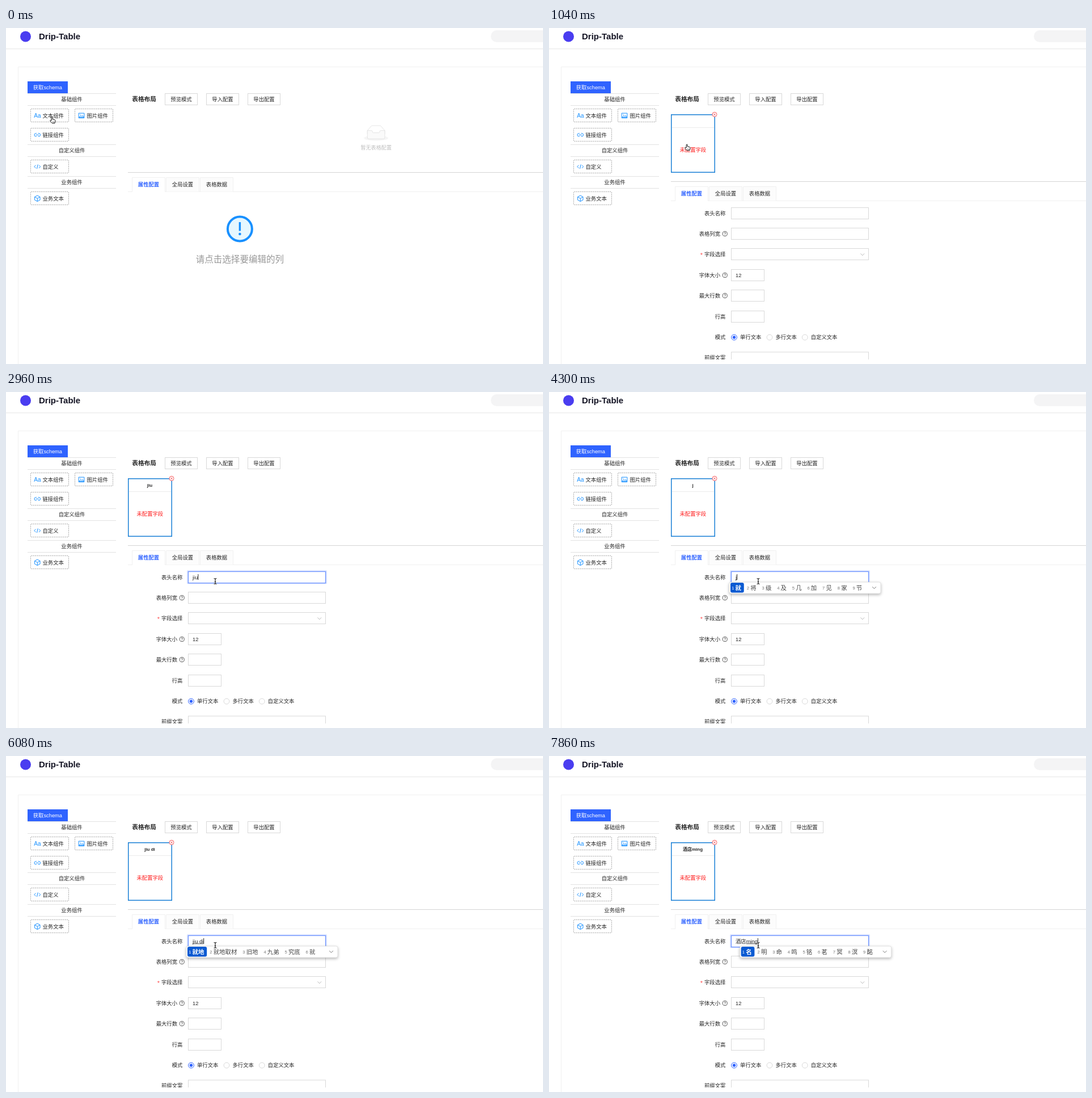
An HTML page that plays this animation: 947 px wide and 592 px high, repeating every 8000 ms.

```html
<!DOCTYPE html>
<html lang="zh-CN">
<head>
<meta charset="utf-8">
<title>Drip-Table</title>
<style>
  html, body { margin: 0; width: 100%; height: 100%; overflow: hidden; background: #fff; }
  svg { display: block; width: 947px; height: 592px; }
  text { font-family: "Liberation Sans", "Noto Sans CJK SC", "Noto Sans CJK", sans-serif; white-space: pre; }
</style>
</head>
<body>
<svg id="stage" viewBox="0 0 947 592" fill="none"></svg>
<script>
const LOOP = 8000;
const BLUE = '#2f63ff', SKY = '#1890ff', INK = '#262626', EDGE = '#d9d9d9', FAINT = '#f0f0f0';

const label = (x, cy, s, { size = 9.33, fill = INK, anchor = 'start', weight = 400, id = '' } = {}) =>
  `<text id="${id}" x="${x}" y="${cy + size * .36}" font-size="${size}" fill="${fill}" text-anchor="${anchor}" font-weight="${weight}">${s}</text>`;
const box = (x, y, w, h, extra = '') =>
  `<rect x="${x + .5}" y="${y + .5}" width="${w - 1}" height="${h - 1}" stroke="${EDGE}" ${extra}/>`;
const path = (d, extra = '') => `<path d="${d}" ${extra}/>`;
const hline = (x1, x2, y, color = EDGE) => path(`M${x1} ${y}H${x2}`, `stroke="${color}"`);
const group = (id, body, extra = '') => `<g id="${id}" ${extra}>${body}</g>`;

const icons = {
  text: label(0, 6.2, 'Aa', { size: 10, fill: SKY }),
  image: path('M.8 1.8H10.6V10.2H.8ZM1.8 9L4.5 5.8 6.3 7.6 8 6 9.8 9ZM3 4h1.2') ,
  link: path('M4.8 3.4H3.3a2.6 2.6 0 0 0 0 5.2H4.8M7.2 3.4H8.7a2.6 2.6 0 0 1 0 5.2H7.2M3.6 6H8.4'),
  code: path('M3.2 3.3L.6 6 3.2 8.7M8.8 3.3L11.4 6 8.8 8.7M6.8 2.2L5.2 9.8'),
  cube: path('M6 .8L10.7 3.3V8.7L6 11.2 1.3 8.7V3.3ZM1.3 3.3L6 6 10.7 3.3M6 6V11.2')
};
const block = (x, y, icon, name) =>
  box(x, y, 68, 24, 'fill="#fff" style="stroke:#a6a6a6" rx="1" stroke-dasharray="2 1.3"') +
  `<g transform="translate(${x + 6.3} ${y + 6.3})" stroke="${icon === 'text' ? 'none' : SKY}">${icons[icon]}</g>` +
  label(x + 21.5, y + 12.7, name);

const section = (y, name) =>
  hline(38, 194, y + .5, '#e2e2e2') + hline(38, 194, y + 21.5, '#e2e2e2') +
  label(116, y + 11, name, { anchor: 'middle' });

const header = `
  <circle cx="34.5" cy="15" r="9.5" fill="#4a3df0"/>
  ${label(58, 15, 'Drip-Table', { size: 15, fill: '#141424', weight: 700 })}
  <rect x="855" y="4" width="110" height="21" rx="10.5" fill="#f4f4f5"/>
  ${hline(0, 947, 36.5, '#ececec')}${hline(0, 947, 37.5, '#f8f8f8')}
  ${path('M21.5 592V68.5H947', `stroke="${FAINT}"`)}`;

const sidebar = `
  <rect x="38" y="94" width="71" height="21" fill="${BLUE}"/>
  ${label(73.4, 104.7, '获取schema', { fill: '#fff', anchor: 'middle' })}
  ${section(115, '基础组件')}${section(205, '自定义组件')}${section(261, '业务组件')}
  ${block(43, 142, 'text', '文本组件')}${block(121, 142, 'image', '图片组件')}
  ${block(43, 176, 'link', '链接组件')}${block(43, 232, 'code', '自定义')}
  ${block(43, 288, 'cube', '业务文本')}`;

const toolbar = label(222.3, 125.5, '表格布局', { size: 10.67, weight: 700 }) +
  ['预览模式', '导入配置', '导出配置'].map((name, i) =>
    box(280 + i * 73, 115, 58, 21) + label(309 + i * 73, 125.7, name, { anchor: 'middle' })).join('');

const emptyTable = `
  <g transform="translate(631.3 172) scale(.667)" stroke="${EDGE}">
    <ellipse cx="32" cy="33" rx="32" ry="7" fill="#f5f5f5" stroke="none"/>
    <path d="M9 13L19.2 1.3Q20 0 21.1 0H42.9Q44 0 44.8 1.3L55 13V22H9Z" fill="#fff"/>
    <path d="M9 13H20.2Q22.4 13.2 22.4 16T24.6 18.9H39.4Q41.6 18.7 41.6 16T43.8 13H55V31Q55 35 52 35H12Q9 35 9 31Z" fill="#fafafa"/>
  </g>
  ${label(652.7, 210.7, '暂无表格配置', { size: 9.1, fill: '#bfbfbf', anchor: 'middle' })}`;

const tabs = hline(215, 947, 254.5, '#d4d4d4') + hline(215, 947, 288.5, FAINT) +
  ['属性配置', '全局设置', '表格数据'].map((name, i) => {
    const x = 222 + i * 60;
    return `<path d="M${x + .5} 288.5V263.5H${x + 58.5}V288.5" stroke="${FAINT}" fill="${i ? '#fcfcfc' : '#fff'}"/>` +
      (i ? '' : hline(x + 1, x + 58, 288.5, '#fff')) +
      label(x + 29.5, 276, name, { anchor: 'middle', fill: i ? INK : BLUE, weight: i ? 400 : 700 });
  }).join('');

const prompt = `
  <circle cx="412.4" cy="354" r="21.5" fill="#e6f7ff" stroke="${SKY}" stroke-width="4"/>
  <rect x="410.7" y="342" width="3.4" height="15.5" rx=".6" fill="${SKY}"/>
  <circle cx="412.4" cy="363" r="2.3" fill="${SKY}"/>
  ${label(412.4, 407, '请点击选择要编辑的列', { size: 15.55, fill: '#999', anchor: 'middle' })}`;

const card = `
  <rect x="215.75" y="152.75" width="76.5" height="101.5" fill="#fff" stroke="#1a80d6" stroke-width="1.5"/>
  ${hline(217, 291, 175.5, '#ebebeb')}
  ${label(253.5, 163.8, '', { size: 8, weight: 700, anchor: 'middle', id: 'title' })}
  ${label(253.8, 214.8, '未配置字段', { fill: '#ff1a1a', anchor: 'middle' })}
  <circle cx="292" cy="152.3" r="4" fill="#fff" stroke="#f5484b" stroke-width=".9"/>
  ${path('M290.4 150.7l3.2 3.2m0-3.2l-3.2 3.2', 'stroke="#f5484b" stroke-width=".9"')}`;

const help = cy => `<circle cx="310.2" cy="${cy}" r="4.1" stroke="#444" stroke-width=".9"/>` +
  label(310.2, cy, '?', { size: 7, anchor: 'middle', fill: '#333' });
const row = (cy, name, width, hint, id = '') =>
  label(hint ? 302 : 311.3, cy, name, { anchor: 'end' }) + (hint ? help(cy) : '') +
  (width ? box(321, cy - 10.5, width, 21, `id="${id}" fill="#fff"`) : '');
const radio = (x, name, on) =>
  `<circle cx="${x}" cy="545" r="4.9" fill="#fff" stroke="${on ? BLUE : EDGE}"/>` +
  (on ? `<circle cx="${x}" cy="545" r="2.7" fill="${BLUE}"/>` : '') + label(x + 10.5, 545, name);

const form = `
  ${group('glow', '<rect x="320" y="315" width="245" height="22.5" rx="1" stroke="#2f63ff" stroke-opacity=".25" stroke-width="1.6"/>')}
  ${row(326.5, '表头名称', 243, false, 'nameField')}
  ${row(362.5, '表格列宽', 243, true, 'widthField')}
  ${row(398.5, '字段选择', 243)}
  ${label(266.7, 400.3, '*', { fill: '#ff4d4f', size: 11 })}
  ${path('M549.5 397.3l3.3 3.6 3.3-3.6', 'stroke="#bbb"')}
  ${row(435.5, '字体大小', 59, true)}${label(329, 435.5, '12')}
  ${row(471.5, '最大行数', 59, true)}
  ${row(508.5, '行高', 59)}
  ${row(545, '模式', 0)}
  ${radio(326.5, '单行文本', true)}${radio(389, '多行文本')}${radio(451.3, '自定义文本')}
  ${row(581, '前缀文案', 243)}
  ${label(329, 326.3, '', { id: 'typed' })}
  <path id="underline" stroke="#333" stroke-width=".8"/>
  <path id="caret" stroke="#111" stroke-width=".9"/>`;

const popup = `
  <rect width="267" height="20" y="335" rx="3" fill="#fff" stroke="#cfcfcf" stroke-width=".6" filter="url(#shadow)"/>
  <rect id="picked" x="2" y="336" height="17.5" rx="3" fill="#0a5ad2"/>
  <g id="options"></g>
  ${path('M252.2 343.2l3.3 3.3 3.3-3.3', 'stroke="#777"')}`;

const hand = path('M3.2 7V1.6Q4.3.2 5.2 1.6V4.8L8.8 5.6Q10.2 6 10 7.5L9 11.8H4.4L.8 7.6Q.8 6 2 6.4Z',
  'fill="#fff" stroke="#111" stroke-linejoin="round" transform="translate(-4 -5)"') +
  path('M1.6 3.5v2M3.4 3.7v2', 'stroke="#111" stroke-width=".7"');
const beam = ['#fff', '#111'].map((c, i) =>
  path('M-2.4-4.5Q0-4.5 0-3Q0-4.5 2.4-4.5M0-3V4M-2.4 5.3Q0 5.3 0 3.8Q0 5.3 2.4 5.3M-1.2 1.5H1.2', `stroke="${c}" stroke-width="${i ? 1.1 : 2.4}"`)).join('');
const arrow = path('M0 0V10.5L2.5 8.2 4.2 12 5.8 11.3 4.2 7.6H7.5Z', 'fill="#111" stroke="#fff" stroke-width=".8"');

const stage = document.getElementById('stage');
stage.innerHTML = `
  <defs>
    <filter id="shadow" x="-10%" y="-50%" width="120%" height="220%"><feDropShadow dx="0" dy="2" stdDeviation="2.5" flood-opacity=".3"/></filter>
    <clipPath id="panel"><path d="M0 0H947V584H0Z"/></clipPath>
  </defs>
  <path d="M0 0H947V592H0Z" fill="#fff"/>
  ${header}${sidebar}${toolbar}
  ${group('emptyTable', emptyTable)}${group('card', card)}${group('tabs', tabs)}
  ${group('prompt', prompt)}${group('form', form, 'clip-path="url(#panel)"')}
  ${group('popup', popup)}
  ${group('ghost', block(43, 142, 'text', '文本组件'), 'opacity=".6"')}
  ${group('cursor', group('hand', hand) + group('beam', beam) + group('arrow', arrow))}`;

const $ = Object.fromEntries([...stage.querySelectorAll('[id]')].map(el => [el.id, el]));

// Pointer: start time, x, y, shape
const pointer = [
  [0, 81, 161, 'hand'], [300, 122, 174, 'arrow'], [450, 178, 193, 'arrow'], [590, 232, 208, 'arrow'],
  [740, 243, 209, 'hand'], [1040, 243, 209, 'hand'], [1190, 306, 283, 'arrow'],
  [1330, 352, 356, 'beam'], [1480, 362, 345, 'beam'], [1630, 369, 333, 'beam']
];
// Typing: start time, committed text, text being composed, candidates
const typing = [
  [0, '', '', ''], [2810, 'j', '', ''], [2960, 'jiu', '', ''],
  [3700, 'ji', '', ''], [3850, 'j', '', ''], [4000, '', '', ''],
  [4300, '', 'j', '就 将 级 及 几 加 见 家 节'],
  [4450, '', 'ji', '及 几 级 即 记 机 及 集 既'],
  [4600, '', 'jiu', '就 九 久 酒 旧 救 舅 究 揪'],
  [5040, '', 'jiu f', '九分 纠纷 酒疯 旧房 就范 纠风'],
  [5490, '', 'jiu fi', '九分 就 九 久 酒 旧 救'],
  [5640, '', 'jiu f', '九分 纠纷 酒疯 旧房 就范 纠风'],
  [5780, '', 'jiu', '就 九 久 酒 旧 救 舅 究 揪'],
  [5930, '', 'jiu d', '就到 酒店 就地 旧的 就得 九点'],
  [6080, '', 'jiu di', '就地 就地取材 旧地 九弟 究底 就'],
  [6520, '', 'jiu dia', '酒店 九点 旧店 就 九 久'],
  [6670, '', 'jiu dian', '酒店 九点 就点 旧店 久点 就'],
  [7120, '酒店', '', ''],
  [7560, '酒店', 'm', '吗 没 么 们 买 明 名 每 美'],
  [7710, '酒店', 'min', '民 敏 闽 皿 悯 闵 抿 泯 岷'],
  [7860, '酒店', 'ming', '名 明 命 鸣 铭 茗 冥 溟 酩']
];

const at = (track, t) => track.findLast(step => step[0] <= t);
const show = (el, on) => el.setAttribute('display', on ? 'inline' : 'none');

function drawOptions(candidates) {
  let x = 4.2;
  const words = candidates.split(' ');
  $.picked.setAttribute('width', 13.3 + 10.45 * words[0].length);
  $.options.innerHTML = words.map((word, i) => {
    const item = label(x, 345.3, i + 1, { size: 7.6, fill: i ? '#777' : '#fff' }) +
      label(x + 6.4, 344.8, word, { size: 10.45, fill: i ? '#444' : '#fff', weight: i ? 400 : 700 });
    x += 16.2 + 10.45 * word.length;
    return item;
  }).join('');
}

let lastStep;
function update(t) {
  const [, px, py, shape] = at(pointer, t);
  $.cursor.setAttribute('transform', `translate(${px} ${py})`);
  for (const kind of ['hand', 'beam', 'arrow']) show($[kind], kind === shape);
  $.ghost.setAttribute('transform', `translate(${px - 81} ${py - 161})`);

  const dropped = t >= 740, editing = t >= 890, focused = t >= 1780;
  show($.ghost, t >= 300 && !dropped);
  show($.emptyTable, !dropped);
  show($.card, dropped);
  $.tabs.setAttribute('transform', `translate(0 ${dropped ? 16 : 0})`);
  show($.prompt, !editing);
  $.prompt.setAttribute('transform', `translate(0 ${dropped ? 16 : 0})`);
  show($.form, editing);
  show($.glow, focused);
  $.nameField.setAttribute('stroke', t >= 1630 ? '#5a85ff' : EDGE);
  $.widthField.setAttribute('stroke', t >= 1330 && t < 1630 ? '#5a85ff' : EDGE);

  const step = at(typing, t);
  const [, fixed, composing, candidates] = step;
  if (step !== lastStep) {
    lastStep = step;
    $.title.textContent = $.typed.textContent = fixed + composing;
    const width = n => n ? $.typed.getSubStringLength(0, n) : 0;
    const start = editing ? 329 + width(fixed.length) : 329;
    const end = editing ? 329 + width(fixed.length + composing.length) : 329;
    $.underline.setAttribute('d', composing ? `M${start} 330.8H${end}` : '');
    $.caret.setAttribute('d', `M${end + .5} 321V331`);
    $.popup.setAttribute('transform', `translate(${start - 11} 0)`);
    show($.popup, candidates);
    if (candidates) drawOptions(candidates);
  }
  const blinkedOff = (t >= 2510 && t < 2810) || (t >= 3550 && t < 3700);
  show($.caret, t >= 1920 && !blinkedOff);
}

const origin = performance.now();
function tick() {
  update((performance.now() - origin) % LOOP);
  requestAnimationFrame(tick);
}
tick();
</script>
</body>
</html>
```
